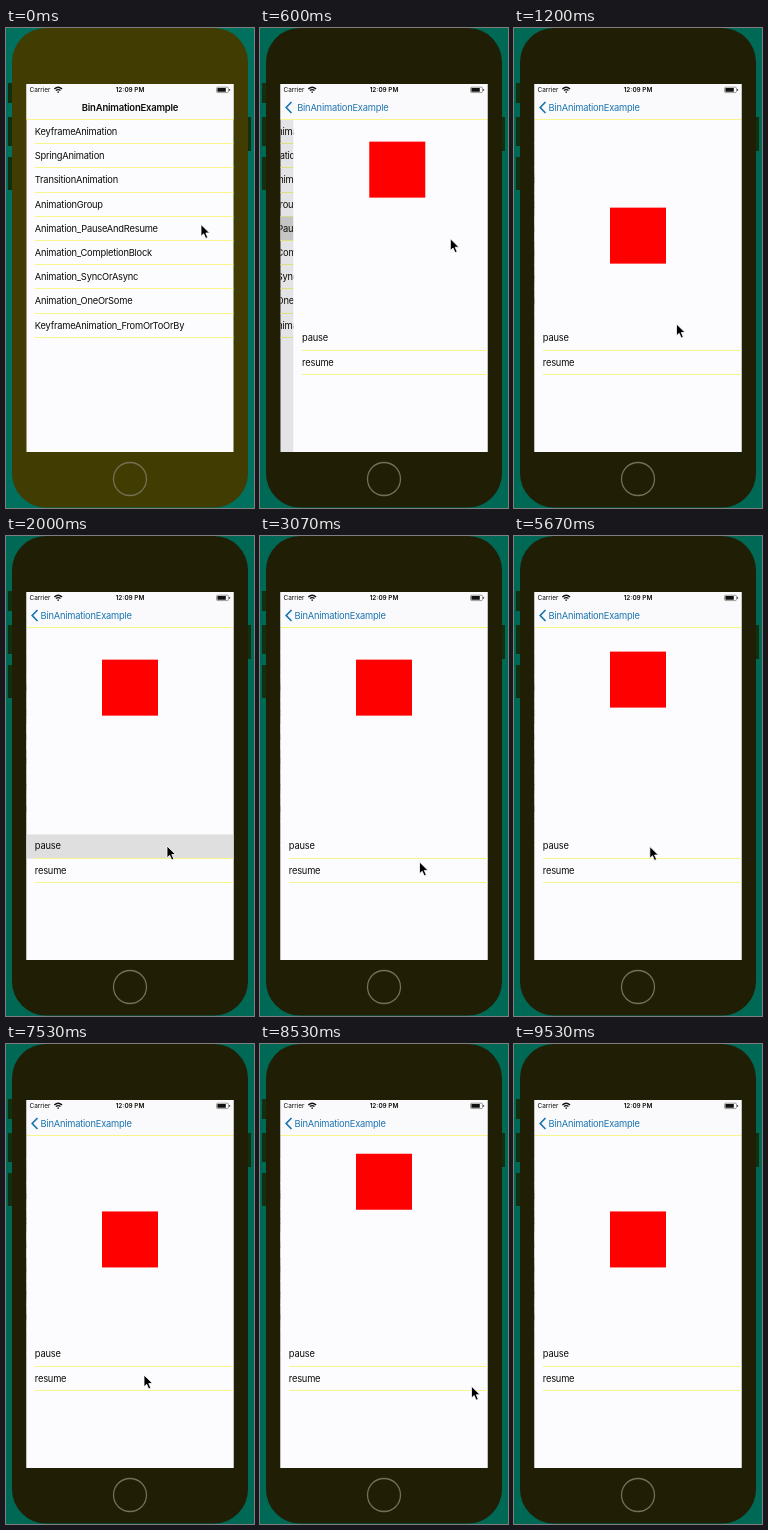
Recreate the animation shown at these times as an HTML page. Size 248 px wide and 480 px high, loop 9.59 s.

```html
<!DOCTYPE html>
<html lang="en">
<head>
<meta charset="utf-8">
<style>
  html, body { margin: 0; width: 100%; height: 100%; overflow: hidden; background: #006956; }
  svg { display: block; width: 248px; height: 480px; }
  text { font: 9.3px Inter, Roboto, sans-serif; letter-spacing: -.022em; fill: #0c0c08; }
  .title { font-size: 9.5px; font-weight: 600; text-anchor: middle; }
  .status { font-size: 6.4px; letter-spacing: 0; }
  .bold { font-weight: 600; text-anchor: middle; }
  .line { fill: #f7f58c; shape-rendering: crispEdges; }
  .link { fill: #1c74ae; }
</style>
</head>
<body>
<svg viewBox="0 0 248 480">
  <defs><clipPath id="screen"><path d="M20.5 56h207v368h-207z"/></clipPath></defs>
  <rect id="backdrop" width="248" height="480"/>
  <path fill="#12300f" d="M2 55h5v20h-5zM2 89h5v29h-5zM2 129h5v33h-5zM241 89h4v34h-4z"/>
  <rect id="body" x="6" y="0" width="236" height="479.5" rx="34"/>
  <circle cx="124" cy="451" r="16.5" fill="none" stroke="#747054" stroke-width="1.3"/>
  <g clip-path="url(#screen)">
    <path fill="#fcfcff" d="M20 56h208v368h-208z"/>
    <g id="list"></g>
    <rect id="shade" x="20" y="92" width="208" height="332" opacity="0"/>
    <g id="detail">
      <path fill="#fcfcff" d="M20 92h208v332h-208z"/>
      <rect id="box" x="96" width="56" height="56" fill="#fe0000"/>
    </g>
    <path fill="#fafafd" d="M20 56h208v35h-208z"/>
    <path class="line" d="M20 91h208v1h-208z"/>
    <text id="title" class="title" x="124" y="82.6">BinAnimationExample</text>
    <g id="back">
      <path d="M31.5 74l-5.3 5.5 5.3 5.5" fill="none" stroke="#1c74ae" stroke-width="1.7"/>
      <text id="backLabel" class="link" x="34.5" y="82.6">BinAnimationExample</text>
    </g>
    <text class="status" x="23.5" y="64">Carrier</text>
    <text class="status bold" x="124" y="64">12:09 PM</text>
    <g fill="none" stroke="#111" stroke-width="1.3">
      <path d="M48.3 61q3.9-3.6 7.8 0M49.9 62.6q2.3-2 4.6 0"/>
      <path d="M51.4 64.1h1.6"/>
    </g>
    <rect x="210.5" y="59.2" width="12" height="5.4" rx="1.3" fill="none" stroke="#77776c" stroke-width=".7"/>
    <path d="M211.4 60.1h8.4v3.6h-8.4zM223.3 61h.8v1.8h-.8z" fill="#111"/>
  </g>
  <path id="cursor" d="M0 0v11.8l2.7-2.5 2 4.6 2.1-.9-2-4.5h3.8z" fill="#000" stroke="#fff" stroke-width=".8"/>
</svg>
<script>
const LOOP = 9590, FPS = 15, ROW = 24.2;
const $ = id => document.getElementById(id);
const set = (id, attrs) => { for (const a in attrs) $(id).setAttribute(a, attrs[a]); };
const clamp = v => Math.max(0, Math.min(1, v));
const smooth = v => v * v * (3 - 2 * v);

const addRow = (page, label, y, id) => $(page).insertAdjacentHTML('beforeend',
  `<rect id="${id}" x="20" y="${y}" width="208" height="${ROW}" fill="#d9d9d9" opacity="0"/>
   <text x="28.8" y="${Math.round(y + 15)}">${label}</text>
   <path class="line" d="M29 ${Math.floor(y + ROW - .5)}h199v1h-199z"/>`);

['KeyframeAnimation', 'SpringAnimation', 'TransitionAnimation', 'AnimationGroup',
 'Animation_PauseAndResume', 'Animation_CompletionBlock', 'Animation_SyncOrAsync',
 'Animation_OneOrSome', 'KeyframeAnimation_FromOrToOrBy']
  .forEach((label, i) => addRow('list', label, 91.9 + i * ROW, 'item' + i));
addRow('detail', 'pause', 298.4, 'pause');
addRow('detail', 'resume', 322.6, 'resume');

// Time and place of the pointer tip
const route = [[0, 195, 196.5], [500, 195, 196.5], [1200, 162.5, 296], [1600, 161, 310],
  [2400, 161, 310], [3070, 159.5, 326], [3300, 159.5, 332], [4400, 159.5, 332], [5250, 135.8, 310.5],
  [5750, 135.8, 310.5], [6350, 138, 331], [8000, 138, 331], [8900, 262, 350]];
function pointer(t) {
  const i = route.findIndex(p => p[0] > t);
  if (i < 0) return route[route.length - 1].slice(1);
  const [t0, x0, y0] = route[i - 1], [t1, x1, y1] = route[i];
  const k = (t - t0) / (t1 - t0);
  return [x0 + (x1 - x0) * k, y0 + (y1 - y0) * k];
}

// The box bounces with one second each way; its clock stops while paused
const START = 327, PAUSES = [[1963, 3370], [5443, 6480]];
function boxTop(t) {
  let clock = t - START;
  for (const [from, to] of PAUSES) clock -= Math.max(0, Math.min(t, to) - from);
  const phase = Math.max(0, clock / 1000) % 2;
  return 83.6 + 110 * (phase < 1 ? phase : 2 - phase);
}

const flash = (t, clicks) =>
  Math.max(...clicks.map(c => t < c - 70 ? 0 : clamp((c + 200 - t) / 200)));

function draw(t) {
  const push = 1 - Math.pow(1 - clamp((t - 300) / 500), 3);
  const [x, y] = pointer(t);
  set('backdrop', { fill: push ? '#006956' : '#00705f' });
  set('body', { fill: push ? '#211e06' : '#403c02' });
  set('list', { transform: `translate(${-62 * push})` });
  set('shade', { opacity: .1 * push });
  set('detail', { transform: `translate(${207.5 * (1 - push)})` });
  set('title', { transform: `translate(${-44 * push})`, opacity: clamp(1 - push * 1.5) });
  set('back', { opacity: smooth(push) });
  set('backLabel', { transform: `translate(${42 * (1 - push)})` });
  set('box', { y: boxTop(t) });
  set('item4', { opacity: t > 180 ? 1 : 0 });
  set('pause', { opacity: flash(t, PAUSES.map(p => p[0])) });
  set('resume', { opacity: flash(t, PAUSES.map(p => p[1])) });
  set('cursor', { transform: `translate(${x} ${y})` });
}

function tick() {
  const t = performance.now() % LOOP;
  draw(Math.floor((t + 5) * FPS / 1000) * 1000 / FPS);
  requestAnimationFrame(tick);
}
tick();
</script>
</body>
</html>
```
